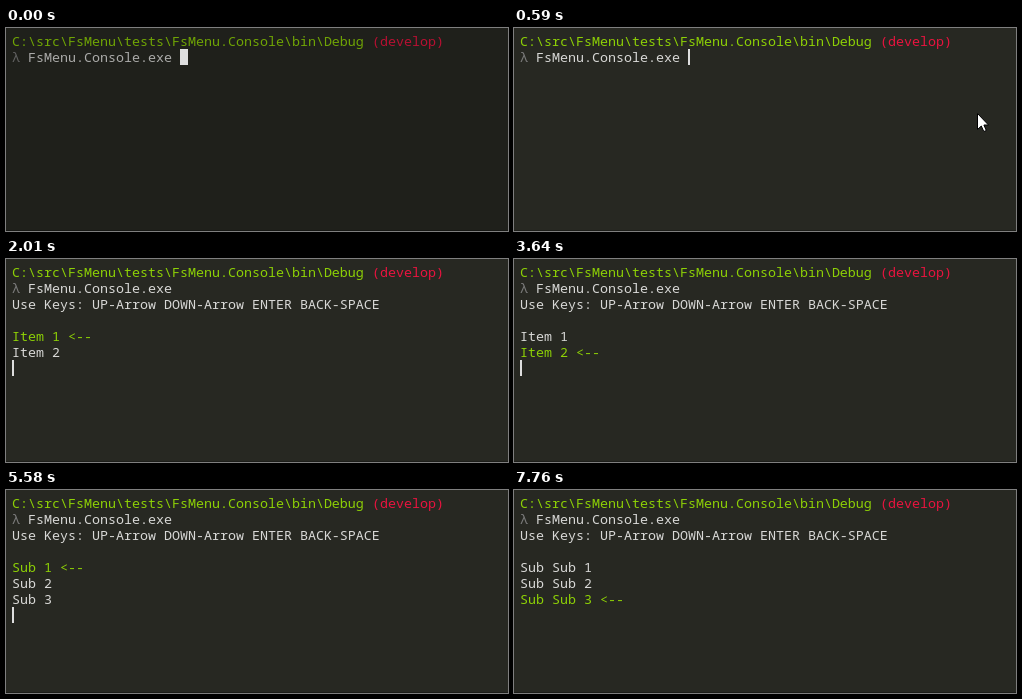
An HTML page that plays this animation: 502x203 px, repeating every 8 s.

```html
<!DOCTYPE html>
<html lang="en">
<head>
<meta charset="utf-8">
<title>Console menu</title>
<style>
  html, body { margin: 0; width: 100%; height: 100%; overflow: hidden; background: #272822; }
  svg { display: block; }
  text {
    font: 13.3333px "Noto Sans Mono", "DejaVu Sans Mono", monospace;
    white-space: pre;
    fill: #d8d8d6;
  }
  .green { fill: #8dd006; }
  .red { fill: #e8143f; }
  .gray { fill: #7c7c7c; }
</style>
</head>
<body>
<svg id="stage" width="502" height="203" viewBox="0 0 502 203">
  <rect width="502" height="203" fill="#272822"/>
  <rect y="202" width="502" height="1" fill="#1c1d19"/>
  <g id="lines"></g>
  <rect id="shade" width="502" height="203" fill="#000" opacity=".21"/>
  <rect id="caret" height="16" fill="#dedede"/>
  <path id="pointer" d="M.5 .5V16.5L4.3 13L6.8 18.5L9.3 17.5L6.9 12H11.5Z" fill="#fff" stroke="#000"/>
</svg>
<script>
const LOOP = 8000;
const CELL_W = 8, CELL_H = 16, LEFT = 6, TOP = 5, BASELINE = 13, MENU_ROW = 4;
const FOCUS = 510, RUN = 1930, BLINK = 530;
const $ = id => document.getElementById(id);

function setAttrs(el, attrs) {
  for (const name in attrs) el.setAttribute(name, attrs[name]);
}

function addLine(row, col = 0, content = "", tone = "") {
  const el = document.createElementNS("http://www.w3.org/2000/svg", "text");
  setAttrs(el, { x: LEFT + col * CELL_W, y: TOP + row * CELL_H + BASELINE, class: tone });
  el.textContent = content;
  $("lines").append(el);
  return el;
}

const path = "C:\\src\\FsMenu\\tests\\FsMenu.Console\\bin\\Debug";
const command = "FsMenu.Console.exe";
addLine(0, 0, path, "green");
addLine(0, path.length + 1, "(develop)", "red");
addLine(1, 0, "λ", "gray");
addLine(1, 2, command);
const help = addLine(2, 0, "Use Keys: UP-Arrow DOWN-Arrow ENTER BACK-SPACE");
const slots = [0, 1, 2].map(i => addLine(MENU_ROW + i));

// Opening a menu selects its first entry; every other action moves one down.
const actions = [
  { at: 2010, open: "Item", count: 2, wake: true },
  { at: 3640, wake: true },
  { at: 4020, open: "Sub", count: 3, wake: true },
  { at: 6050, open: "Sub Sub", count: 3 },
  { at: 7290 },
  { at: 7440 }
];

function replay(t) {
  const state = { name: "", count: 0, selected: 0, wokenAt: FOCUS };
  for (const { at, open, count, wake } of actions) {
    if (at > t) break;
    if (open) Object.assign(state, { name: open, count, selected: 0 });
    else state.selected++;
    if (wake) state.wokenAt = at;
  }
  return state;
}

function drawMenu({ name, count, selected }) {
  help.style.display = count ? "" : "none";
  slots.forEach((slot, i) => {
    const active = i === selected;
    slot.textContent = i < count ? `${name} ${i + 1}${active ? " <--" : ""}` : "";
    slot.setAttribute("class", active ? "green" : "");
  });
}

function drawCaret(t, { count, wokenAt }) {
  const col = t < RUN ? command.length + 3 : 0;
  const row = count ? MENU_ROW + count : t < RUN ? 1 : 2;
  const lit = t < FOCUS || Math.floor((t - wokenAt) / BLINK) % 2 === 0;
  setAttrs($("caret"), {
    x: LEFT + col * CELL_W,
    y: TOP + row * CELL_H,
    width: lit ? (t < FOCUS ? CELL_W : 2) : 0
  });
}

// The pointer slows down on a straight way in, nudges right and leaves.
function drawPointer(t) {
  const enter = 70, nudge = 760, leave = 830, hold = 72.5, steps = 7;
  const progress = Math.min(1, Math.floor((t - enter) / hold) / steps);
  const left = Math.max(0, 1 - progress) ** 1.85;
  const x = Math.round(463 - 47 * left) + (t >= nudge ? 6 : 0);
  const y = Math.round(85 + 95 * left);
  $("pointer").setAttribute("transform", `translate(${x} ${y})`);
  $("pointer").style.display = t >= enter && t < leave ? "" : "none";
}

function draw(t) {
  const state = replay(t);
  drawMenu(state);
  drawCaret(t, state);
  drawPointer(t);
  $("shade").style.display = t < FOCUS ? "" : "none";
}

const start = performance.now();
function tick() {
  draw((performance.now() - start) % LOOP);
  requestAnimationFrame(tick);
}
tick();
</script>
</body>
</html>
```
